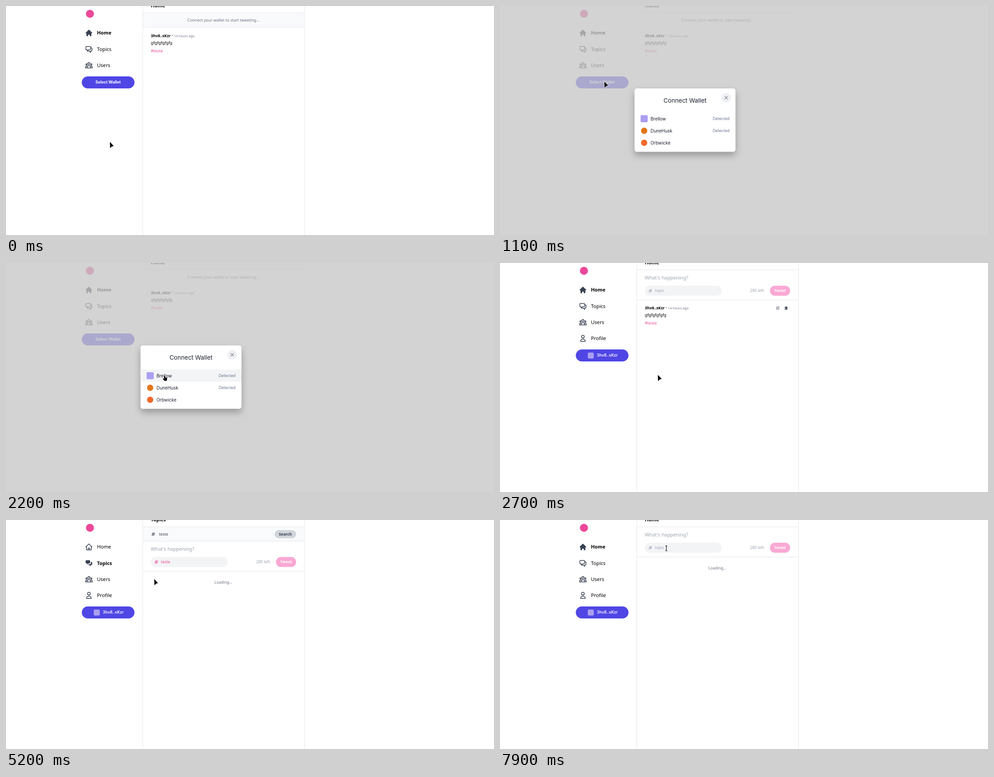
Animation of 1090 by 514 pixels, one loop 8000 ms. Source, as an HTML page with a canvas:

```html
<!DOCTYPE html>
<html lang="en">
<head>
<meta charset="utf-8">
<title>Wallet connection</title>
<style>
html, body { margin: 0; width: 100%; height: 100%; overflow: hidden; background: #fff; }
canvas { display: block; width: 1090px; height: 514px; }
</style>
</head>
<body>
<canvas id="stage"></canvas>
<script>
const W = 1090, H = 514, LOOP = 8000;
const canvas = document.getElementById('stage');
const ctx = canvas.getContext('2d');
const dpr = window.devicePixelRatio || 1;
canvas.width = W * dpr;
canvas.height = H * dpr;

const SANS = '"Noto Sans", "Open Sans", sans-serif';
const GEO = 'Inter, Roboto, sans-serif';
const INK = '#374151', GRAY = '#6b7280', PALE = '#9ca3af', LINE = '#e5e7eb';
const PINK = '#ec4899', INDIGO = '#4f46e5', LILAC = '#ab9ff2';
const ACCOUNT = '3hv8..sKzr';

const ICONS = {
  homeSolid: 'M10.707 2.293a1 1 0 00-1.414 0l-7 7a1 1 0 001.414 1.414L4 10.414V17a1 1 0 001 1h2a1 1 0 001-1v-2a1 1 0 011-1h2a1 1 0 011 1v2a1 1 0 001 1h2a1 1 0 001-1v-6.586l.293.293a1 1 0 001.414-1.414l-7-7z',
  home: 'M3 12l2-2m0 0l7-7 7 7M5 10v10a1 1 0 001 1h3m10-11l2 2m-2-2v10a1 1 0 01-1 1h-3m-6 0a1 1 0 001-1v-4a1 1 0 011-1h2a1 1 0 011 1v4a1 1 0 001 1m-6 0h6',
  chatSolid: 'M2 5a2 2 0 012-2h7a2 2 0 012 2v4a2 2 0 01-2 2H9l-3 3v-3H4a2 2 0 01-2-2V5zM15 7v2a4 4 0 01-4 4H9.828l-1.766 1.767c.28.149.599.233.938.233h2l3 3v-3h2a2 2 0 002-2V9a2 2 0 00-2-2h-1z',
  chat: 'M17 8h2a2 2 0 012 2v6a2 2 0 01-2 2h-2v4l-4-4H9a1.994 1.994 0 01-1.414-.586m0 0L11 14h4a2 2 0 002-2V6a2 2 0 00-2-2H5a2 2 0 00-2 2v6a2 2 0 002 2h2v4l.586-.586z',
  users: 'M17 20h5v-2a3 3 0 00-5.356-1.857M17 20H7m10 0v-2c0-.656-.126-1.283-.356-1.857M7 20H2v-2a3 3 0 015.356-1.857M7 20v-2c0-.656.126-1.283.356-1.857m0 0a5.002 5.002 0 019.288 0M15 7a3 3 0 11-6 0 3 3 0 016 0zm6 3a2 2 0 11-4 0 2 2 0 014 0zM7 10a2 2 0 11-4 0 2 2 0 014 0z',
  user: 'M16 7a4 4 0 11-8 0 4 4 0 018 0zM12 14a7 7 0 00-7 7h14a7 7 0 00-7-7z',
  hash: 'M7 20l4-16m2 16l4-16M6 9h14M4 15h14',
  edit: 'M11 5H6a2 2 0 00-2 2v11a2 2 0 002 2h11a2 2 0 002-2v-5m-1.414-9.414a2 2 0 112.828 2.828L11.828 15H9v-2.828l8.586-8.586z',
  trashSolid: 'M9 2a1 1 0 00-.894.553L7.382 4H4a1 1 0 000 2v10a2 2 0 002 2h8a2 2 0 002-2V6a1 1 0 100-2h-3.382l-.724-1.447A1 1 0 0011 2H9zM7 8a1 1 0 012 0v6a1 1 0 11-2 0V8zm5-1a1 1 0 00-1 1v6a1 1 0 102 0V8a1 1 0 00-1-1z'
};
const paths = {};
for (const name in ICONS) paths[name] = new Path2D(ICONS[name]);

// Each move advances once per 100 ms; "via" bends the path.
const MOVES = [
  { at: 200, steps: 8, to: [233, 169.5] },
  { at: 1500, steps: 8, to: [352.5, 251] },
  { at: 3900, steps: 2, to: [347, 249.5] },
  { at: 4200, steps: 7, to: [331, 132.5] },
  { at: 5600, steps: 9, via: [265, 190], to: [205, 55] },
  { at: 6500, steps: 2, to: [204, 52.5] },
  { at: 7400, steps: 6, via: [290, 60], to: [371.5, 63.5] }
];

function cursorAt(t) {
  let pos = [232, 305];
  for (const m of MOVES) {
    if (t < m.at) break;
    const k = Math.min(1, (Math.floor((t - m.at) / 100) + 1) / m.steps);
    const e = k * k * (3 - 2 * k);
    const via = m.via || pos.map((p, i) => (p + m.to[i]) / 2);
    pos = pos.map((p, i) => (1 - e) ** 2 * p + 2 * e * (1 - e) * via[i] + e * e * m.to[i]);
  }
  return pos;
}

function text(str, x, y, size, color, { weight = 400, font = SANS, align = 'left' } = {}) {
  ctx.font = `${weight} ${size}px ${font}`;
  ctx.textAlign = align;
  ctx.fillStyle = color;
  ctx.fillText(str, x, y + size * 0.36);
}

function box(x, y, w, h, r, color) {
  ctx.fillStyle = color;
  ctx.beginPath();
  ctx.roundRect(x, y, w, h, r);
  ctx.fill();
}

function disc(x, y, r, color) {
  ctx.fillStyle = color;
  ctx.beginPath();
  ctx.arc(x, y, r, 0, 7);
  ctx.fill();
}

function rule(y) {
  ctx.fillStyle = LINE;
  ctx.fillRect(306, y, 360, 1);
}

function icon(name, cx, cy, size, color) {
  const solid = name.endsWith('Solid');
  const grid = solid ? 20 : 24;
  ctx.save();
  ctx.translate(cx - size / 2, cy - size / 2);
  ctx.scale(size / grid, size / grid);
  ctx.lineWidth = 2;
  ctx.lineCap = ctx.lineJoin = 'round';
  ctx.fillStyle = ctx.strokeStyle = color;
  if (solid) ctx.fill(paths[name]);
  else ctx.stroke(paths[name]);
  ctx.restore();
}

const inside = ([x, y], l, t, r, b) => x >= l && x <= r && y >= t && y <= b;

function navItem(label, name, y, active, hover) {
  if (hover) box(169.5, y - 16, 117.5, 32, 16, '#f3f4f6');
  icon(active ? name + 'Solid' : name, 185.2, y, 18.2, INK);
  text(label, 203.2, y, active ? 10.9 : 11.1, '#000', { weight: active ? 700 : 400 });
}

function sidebar(s) {
  disc(187.5, 17.5, 9, PINK);
  const items = [['Home', 'home'], ['Topics', 'chat'], ['Users', 'users']];
  if (s.connected) items.push(['Profile', 'user']);
  items.forEach(([label, name], i) =>
    navItem(label, name, 60.5 + i * 36.2, label === s.page, s.navHover === i));
  const y = s.connected ? 194 : 158;
  box(169.3, y, 117.7, 27, 13.5, s.buttonHover ? '#4338ca' : INDIGO);
  if (s.connected) {
    box(196, y + 7, 13.5, 13.5, 3, LILAC);
    text(ACCOUNT, 216.3, y + 13.3, 8.8, '#fff', { weight: 600, font: GEO });
  } else {
    text('Select Wallet', 228, y + 13.2, 8.9, '#fff', { weight: 700, font: GEO, align: 'center' });
  }
}

function compose(y, topic) {
  text("What's happening?", 323.5, y + 17.5, 10.85, PALE);
  box(323.5, y + 35.5, 171.7, 22.5, 11.25, '#f3f4f6');
  icon('hash', 335.8, y + 46.7, 11, topic ? PINK : PALE);
  text(topic || 'topic', 346, y + 46.7, 8.9, topic ? PINK : PALE);
  text('280 left', 589.5, y + 46.7, 8.9, PALE, { align: 'right' });
  box(603, y + 35.5, 45, 22.5, 11.25, '#f9a8d4');
  text('Tweet', 625.5, y + 46.7, 8.6, '#fff', { weight: 700, align: 'center' });
  rule(y + 67);
}

function tweet(y, s) {
  text(ACCOUNT, 323.5, y, 8.75, '#000', { weight: 700 });
  text('•', 371.5, y, 8, GRAY, { align: 'center' });
  text('14 hours ago', 375, y + 0.3, 7.5, GRAY);
  text('gfgfgfgfgfg', 323.5, y + 16, 8.9, '#000');
  text('#teste', 323.5, y + 34, 9, PINK);
  if (s.tagHover) {
    ctx.fillStyle = PINK;
    ctx.fillRect(323.5, y + 38.4, 27, 0.7);
  }
  if (s.connected) {
    icon('edit', 620.5, y, 9, INK);
    icon('trashSolid', 639, y, 9, INK);
  }
}

function bar() {
  ctx.fillStyle = '#f9fafb';
  ctx.fillRect(306, 16, 360, 31);
  rule(47);
}

function column(s) {
  // The dimmed page shows no column edges or bar.
  if (!s.open) {
    ctx.fillStyle = LINE;
    ctx.fillRect(305, 0, 1, H);
    ctx.fillRect(666, 0, 1, H);
    if (!s.connected || s.page === 'Topics') bar();
  }
  text(s.page, 323.5, -1, 10.9, '#000', { weight: 700 });
  rule(15);
  let y = 15.5;
  if (!s.connected) {
    text('Connect your wallet to start tweeting...', 485.7, 31.5, 8.85, GRAY, { align: 'center' });
    y = 48;
  } else if (s.page === 'Topics') {
    icon('hash', 329, 31.7, 11, INK);
    text('teste', 341.7, 31.5, 8.9, INK);
    box(600, 22.8, 48, 18, 9, '#d1d5db');
    text('Search', 624, 31.6, 8.6, INK, { weight: 700, align: 'center' });
    compose(47.5, 'teste');
    y = 115;
  } else {
    compose(15.5);
    y = 82.7;
  }
  if (s.loading) text('Loading...', 485.6, y + 25.3, 8.7, GRAY, { align: 'center' });
  else tweet(y + 18.5, s);
}

function modal(rowHover) {
  ctx.fillStyle = 'rgba(198,198,198,0.77)';
  ctx.fillRect(0, 0, W, H);
  ctx.save();
  ctx.shadowColor = 'rgba(0,0,0,0.28)';
  ctx.shadowBlur = 16 * dpr;
  ctx.shadowOffsetY = 8 * dpr;
  box(300.5, 185, 225.5, 142.3, 5.5, '#fff');
  ctx.restore();
  text('Connect Wallet', 413.2, 212, 13.4, '#1a1f2e', { font: GEO, align: 'center' });
  disc(505.2, 205.8, 10.7, '#eff0f4');
  ctx.strokeStyle = '#777b86';
  ctx.lineWidth = 1.2;
  ctx.beginPath();
  ctx.moveTo(501.7, 202.3);
  ctx.lineTo(508.7, 209.3);
  ctx.moveTo(508.7, 202.3);
  ctx.lineTo(501.7, 209.3);
  ctx.stroke();

  if (rowHover) box(300.5, 239, 225.5, 27.3, 0, '#f3f4f6');
  box(314, 245, 16, 16, 3, LILAC);
  disc(322, 280, 7, '#e2761b');
  disc(322, 307, 7, '#f2682a');
  ['Brellow', 'DuneHusk', 'Orbwicke'].forEach((name, i) => {
    const y = 253 + i * 27.1;
    text(name, 336.3, y, 9.9, '#1a1f2e', { font: GEO });
    if (i < 2) text('Detected', 512.7, y - 0.2, 8.8, '#6d7590', { font: GEO, align: 'right' });
  });
}

function arrow() {
  ctx.beginPath();
  ctx.moveTo(0, 0);
  ctx.lineTo(8.6, 9.2);
  ctx.lineTo(4.3, 10.3);
  ctx.lineTo(0.6, 14.3);
  ctx.closePath();
}

function hand() {
  ctx.beginPath();
  ctx.moveTo(0.6, 9);
  ctx.lineTo(0.3, 2.4);
  ctx.quadraticCurveTo(1.5, 0.4, 2.7, 2.4);
  ctx.lineTo(2.9, 5.6);
  ctx.lineTo(6.2, 6.3);
  ctx.quadraticCurveTo(7.6, 6.8, 7.4, 8.5);
  ctx.lineTo(6.4, 13.6);
  ctx.lineTo(1.4, 13.6);
  ctx.lineTo(-2.2, 9.3);
  ctx.quadraticCurveTo(-2.2, 7.4, -0.5, 8.2);
  ctx.closePath();
}

function beam() {
  ctx.beginPath();
  ctx.rect(-0.6, -5.5, 1.2, 11);
  ctx.rect(-2.5, -6, 5, 1.1);
  ctx.rect(-2.5, 4.9, 5, 1.1);
}

function cursor([x, y], shape) {
  ctx.save();
  ctx.translate(x, y);
  ctx.lineJoin = 'round';
  ctx.lineWidth = 1.4;
  ctx.strokeStyle = '#fff';
  ctx.fillStyle = '#000';
  shape();
  ctx.stroke();
  ctx.fill();
  ctx.restore();
}

function stateAt(t) {
  const pos = cursorAt(t);
  const open = t >= 1100 && t < 2700;
  const connected = t >= 2700;
  const page = t >= 5100 && t < 6900 ? 'Topics' : 'Home';
  const loading = (t >= 5100 && t < 6500) || t >= 6900;
  const top = connected ? 194 : 158;
  const s = { pos, open, connected, page, loading, navHover: -1 };
  if (!open) {
    s.buttonHover = inside(pos, 169, top, 287, top + 27);
    for (let i = 0; i < (connected ? 4 : 3); i++) {
      const y = 60.5 + i * 36.2;
      if (inside(pos, 169, y - 16, 287, y + 16)) s.navHover = i;
    }
    s.tagHover = connected && page === 'Home' && !loading && inside(pos, 323, 129, 351, 142);
  }
  s.rowHover = open && inside(pos, 300, 239, 526, 266);
  const link = s.buttonHover || s.navHover >= 0 || s.tagHover || s.rowHover || (t >= 5100 && t < 5200);
  const field = connected && page === 'Home' && inside(pos, 323, 51, 495, 74);
  s.shape = link ? hand : field ? beam : arrow;
  return s;
}

function draw(t) {
  const s = stateAt(t);
  ctx.setTransform(dpr, 0, 0, dpr, 0, 0);
  ctx.fillStyle = '#fff';
  ctx.fillRect(0, 0, W, H);
  sidebar(s);
  column(s);
  if (s.open) modal(s.rowHover);
  cursor(s.pos, s.shape);
}

let start;
function tick(now) {
  if (start === undefined) start = now;
  draw((now - start) % LOOP);
  requestAnimationFrame(tick);
}
draw(0);
requestAnimationFrame(tick);
</script>
</body>
</html>
```
